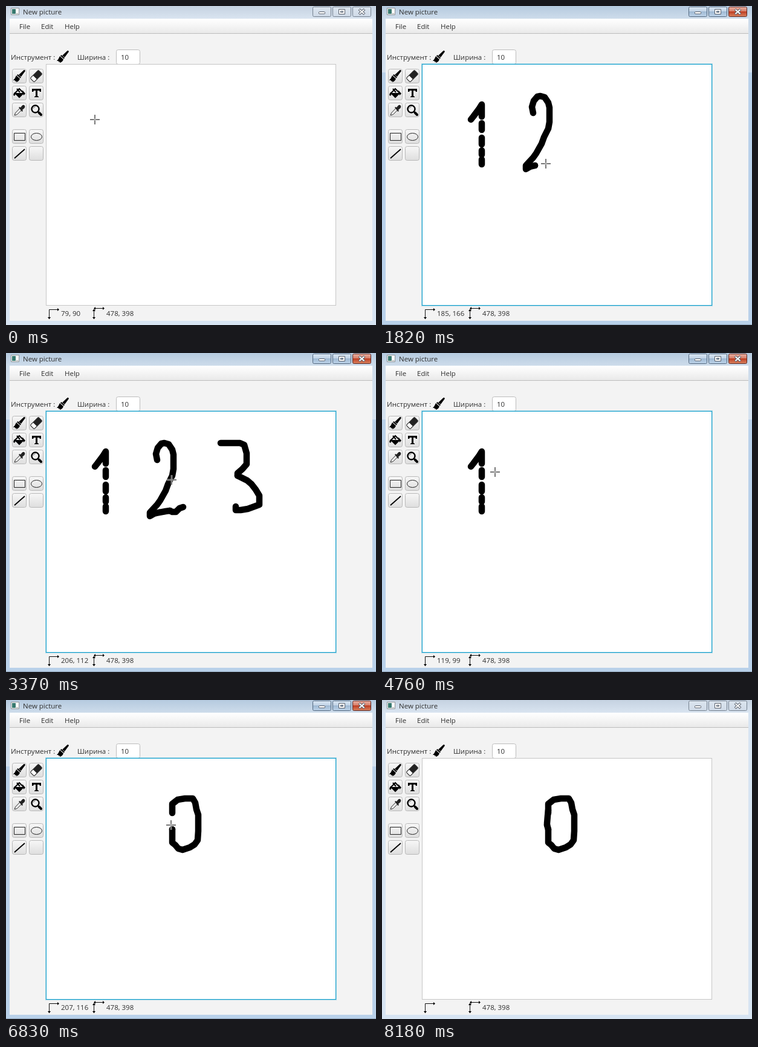
An HTML page that plays this animation: 612x528 px, repeating every 8240 ms.

```html
<!DOCTYPE html>
<html lang="ru">
<head>
<meta charset="utf-8">
<title>New picture</title>
<style>
  html, body { margin: 0; width: 100%; height: 100%; overflow: hidden; background: #d7e4f2; }
  svg { display: block; width: 612px; height: 528px; }
  text { font: 11.5px "Open Sans", "Noto Sans", sans-serif; fill: #2f2f2f; white-space: pre; }
  .on, .active .off { display: none; }
  .active .on { display: inline; }
  .btn { fill: url(#face); stroke: #b9b9b9; }
  .thin { fill: none; stroke: #222; }
  .cap { fill: url(#capOff); stroke: #75818f; }
  .active .cap { fill: url(#capOn); stroke: #53687f; }
  .active .close { fill: url(#capRed); stroke: #5c2620; }
  .glyph { fill: #fff; stroke: #58606c; }
  .sheet { fill: #fff; stroke: #c6c6c6; }
  .active .sheet { stroke: #129fcb; }
  #ink path { fill: none; stroke: #000; stroke-width: 10.5; stroke-linecap: round; stroke-linejoin: round; }
  #ink path.move { stroke: none; }
</style>
</head>
<body>
<svg id="app" viewBox="0 0 612 528">
  <defs>
    <linearGradient id="barOff" x2="0" y2="1">
      <stop stop-color="#c5d2e1"/><stop offset="1" stop-color="#d9e4f0"/>
    </linearGradient>
    <linearGradient id="barOn" x2="0" y2="1">
      <stop stop-color="#b5cadf"/><stop offset=".18" stop-color="#ccdbea"/>
      <stop offset="1" stop-color="#d5e2f0"/>
    </linearGradient>
    <linearGradient id="menu" x2="0" y2="1">
      <stop stop-color="#fff"/><stop offset=".4" stop-color="#f7f7f7"/>
      <stop offset="1" stop-color="#e9e9e9"/>
    </linearGradient>
    <linearGradient id="face" x2="0" y2="1">
      <stop stop-color="#f7f7f7"/><stop offset="1" stop-color="#dedede"/>
    </linearGradient>
    <linearGradient id="capOff" x2="0" y2="1">
      <stop stop-color="#dbe4ee"/><stop offset="1" stop-color="#d0dbe8"/>
    </linearGradient>
    <linearGradient id="capOn" x2="0" y2="1">
      <stop stop-color="#d9e6f3"/><stop offset=".48" stop-color="#c0d2e5"/>
      <stop offset=".5" stop-color="#9fb9d3"/><stop offset="1" stop-color="#bed4ea"/>
    </linearGradient>
    <linearGradient id="capRed" x2="0" y2="1">
      <stop stop-color="#e9b0a2"/><stop offset=".48" stop-color="#d57c67"/>
      <stop offset=".5" stop-color="#bf3e23"/><stop offset="1" stop-color="#d98460"/>
    </linearGradient>
    <g id="brush">
      <path d="M9 -10L10 -8.5L3 1L-1 -2L7 -9.5Q8 -10.5 9 -10Z"/>
      <path d="M-2.5 -3L3 2L1.5 3.5L-4 -1.5Z"/>
      <path d="M-5 -1L1 4.5Q-1 9 -5 10L-5 8L-7 9L-7 7L-10 7Q-7 4 -5 -1Z"/>
    </g>
  </defs>

  <g class="off">
    <path fill="#d7e4f2" d="M0 0H612V528H0Z"/>
    <path fill="url(#barOff)" d="M0 0H612V21H0Z"/>
  </g>
  <g class="on">
    <path fill="#b9d1ea" d="M0 0H612V528H0Z"/>
    <path fill="url(#barOn)" d="M0 0H612V110H0Z"/>
    <path fill="#90a5bb" d="M0 527H612V528H0Z"/>
  </g>

  <path fill="#f3f3f3" d="M6 21H606V521H6Z"/>
  <path fill="url(#menu)" d="M6 21H606V45H6Z"/>
  <path fill="#bdbdbd" d="M6 45H606V46H6Z"/>

  <path fill="#fff" stroke="#8b9195" d="M8.500 3.500H21.500V14.500H8.500Z"/>
  <path fill="#397a70" d="M10 5H16V13H10Z"/>
  <path fill="#555" d="M17 12H18V13H17ZM19 12H20V13H19Z"/>

  <text x="28" y="14">New picture</text>
  <text x="22" y="38">File</text>
  <text x="58" y="38">Edit</text>
  <text x="97" y="38">Help</text>
  <text x="8" y="89">Инструмент :</text>
  <text x="118" y="89">Ширина :</text>
  <use href="#brush" x="94" y="84"/>

  <rect class="cap" x="507.500" y="1.500" width="30" height="16" rx="2"/>
  <rect class="cap" x="540.500" y="1.500" width="30" height="16" rx="2"/>
  <rect class="cap close" x="573.500" y="1.500" width="30" height="16" rx="2"/>
  <rect class="glyph" x="517.500" y="9.500" width="10" height="3.500" rx="1"/>
  <path class="glyph" fill-rule="evenodd" d="M550.500 5.500H560.500V13.500H550.500ZM553.500 8.500H557.500V10.500H553.500Z"/>
  <path fill="none" stroke="#58606c" stroke-width="4" d="M584 5.500L593 13.500M593 5.500L584 13.500"/>
  <path fill="none" stroke="#fff" stroke-width="2" d="M584.500 6L592.500 13M592.500 6L584.500 13"/>

  <rect x="182.500" y="72.500" width="39" height="24" rx="3" fill="#fff" stroke="#bcbcbc"/>
  <text x="190" y="89">10</text>

  <g id="tools"></g>
  <use href="#brush" x="22" y="116"/>
  <g transform="translate(50 116) rotate(-45)">
    <rect x="-9.500" y="-4.500" width="19" height="9" rx="1.500" fill="#fff" stroke="#222"/>
    <path fill="#222" d="M-3 -4.500H8Q9.500 -4.500 9.500 -3V3Q9.500 4.500 8 4.500H-3Z"/>
  </g>
  <path fill="none" stroke="#000" stroke-width="2" d="M22 137L29 144L22 151L15 144ZM18 137L23 143"/>
  <path d="M15 144H29L22 151ZM14 143Q11 147 13 148.500Q16 149 15.500 144ZM27 139L32 145L29 148Z"/>
  <path d="M43 137H58V142H56L55 140H52V149L54 150V151H47V150L49 149V140H46L45 142H43Z"/>
  <path fill="#e9e9e9" stroke="#333" d="M14 181L15.500 177L23 169L26 172L18.500 179.500Z"/>
  <path fill="#222" d="M21 168L22.500 167L24 168L27 164.500Q29 163 31 165Q32 167 30.500 169L27 172L28 173.500L26.500 175Z"/>
  <path stroke="#000" stroke-width="4" stroke-linecap="round" d="M54.500 176.500L58 180"/>
  <circle cx="48.500" cy="170.500" r="6" fill="#eee" stroke="#000" stroke-width="2.400"/>
  <path fill="none" stroke="#777" d="M45 170Q45.500 167 48.500 167"/>
  <path class="thin" d="M13.500 210.500H31.500V222.500H13.500Z"/>
  <ellipse class="thin" cx="50.500" cy="216.500" rx="9" ry="6"/>
  <path stroke="#000" stroke-width="1.800" d="M14 252L31 237"/>

  <rect class="on" x="65.500" y="95.500" width="481" height="401" fill="none" stroke="#129fcb" stroke-opacity=".35"/>
  <rect class="sheet" x="66.500" y="96.500" width="479" height="399"/>

  <g id="ink"></g>

  <path fill="none" stroke="#111" d="M71.500 517V502.500H87M145.500 503V517M147 500.500H161"/>
  <path d="M69 515H74L71.500 518.500ZM85 500V505L88 502.500ZM143 515H148L145.500 518.500ZM143 505H148L145.500 501.500ZM148 498V503L145 500.500ZM160 498V503L163 500.500Z"/>
  <text id="where" x="91" y="513"></text>
  <text x="166" y="513">478, 398</text>

  <g id="cross">
    <path stroke="#fff" stroke-opacity=".5" stroke-width="3" d="M-8 0H8M0 -8V8"/>
    <path stroke="#777" stroke-width="2" d="M-8 0H-1.500M1.500 0H8M0 -8V-1.500M0 1.500V8"/>
    <path stroke="#888" stroke-width="1" d="M-2 0H2M0 -2V2"/>
  </g>
  <path id="arrow" fill="#fff" stroke="#000" d="M.500 .500V16L4 12.500L6.500 18L9 17L6.500 11.500H11.500Z"/>
</svg>
<script>
const LOOP = 8240, STEP = 60, LAG = 60;
const NS = 'http://www.w3.org/2000/svg';
const $ = id => document.getElementById(id);

// Cursor steps restart at each of these times.
const starts = [0, 240, 1090, 1940, 2770, 3610, 4450, 5550, 6110, 6950, 7750, 7810];
// Time at which undo removes each digit.
const gone = { one: 5050, two: 4210, three: 3850, zero: LOOP };

// Start, end, cursor path, digit being drawn.
const legs = [
  [240, 420, 'M147 188L151 183L160 171L165 163V183', 'one'],
  [450, 480, 'M165 194V205', 'one'],
  [520, 540, 'M165 218V229', 'one'],
  [580, 600, 'M165 239V246', 'one'],
  [620, 650, 'M165 254V262', 'one'],
  [660, 900, 'M165 262Q205 235 248 182'],
  [960, 1020, 'M248 182L250 177'],
  [1090, 1750, 'M250 177L248 167L251 157L257 150L262 149L269 151L275 160L277 168V192L275 203L268 217L264 228L255 244L250 251L238 264V270L245 266L253 264', 'two'],
  [1750, 1810, 'M253 264L264 262L271 261', 'two'],
  [1810, 2020, 'M271 261L275 263H281L287 257L293 255', 'two'],
  [2060, 2360, 'M293 255Q320 190 355 149'],
  [2360, 2700, 'M355 149H387L394 152L398 166V184L391 192L383 199V203', 'three'],
  [2710, 3130, 'M383 203L391 207L399 211L406 217L413 226L419 236V251L411 254L400 258L388 260H380V254', 'three'],
  [3140, 3370, 'M380 254L274 210'],
  [3610, 4330, 'M274 210Q340 260 386 230'],
  [4450, 4750, 'M386 230L187 197'],
  [4750, 5110, 'M187 197L170 230'],
  [5550, 5850, 'M170 230L275 192'],
  [6110, 6770, 'M275 187V172L284 165L296 163H309L313 170L315 181L318 190V217L317 232L312 239L304 244L292 248L285 246L280 240L275 236V214', 'zero'],
  [6770, 6830, 'M275 214L273 207', 'zero'],
  [6830, 6950, 'M273 207V204L274 192L275 182', 'zero'],
  [7010, 7730, 'M275 182L535 497'],
].map(([from, to, d, digit]) => {
  const path = document.createElementNS(NS, 'path');
  path.setAttribute('d', d);
  if (!digit) path.setAttribute('class', 'move');
  $('ink').append(path);
  return { from, to, digit, path, len: path.getTotalLength() };
});

for (const y of [104, 132, 160, 204, 232]) {
  for (const x of [10, 38]) {
    const r = document.createElementNS(NS, 'rect');
    const box = { class: 'btn', x: x + .5, y: y + .5, width: 23, height: 23, rx: 3 };
    for (const k in box) r.setAttribute(k, box[k]);
    $('tools').append(r);
  }
}

const part = (leg, t) => Math.max(0, Math.min(1, (t - leg.from) / (leg.to - leg.from)));
const legAt = t => legs.findLast(l => l.from <= t) || legs[0];
function cursorAt(t) {
  const leg = legAt(t);
  return leg.path.getPointAtLength(leg.len * part(leg, t));
}
function snap(t) {
  const s = starts.findLast(v => v <= t);
  return s + Math.floor((t - s) / STEP) * STEP;
}
const show = (el, on) => { el.style.display = on ? '' : 'none'; };

function draw() {
  const now = performance.now() % LOOP, t = snap(now);
  $('app').classList.toggle('active', now >= 240 && now < 8180);

  for (const leg of legs) {
    if (!leg.digit) continue;
    const tip = t - LAG;
    show(leg.path, tip >= leg.from && t < gone[leg.digit]);
    leg.path.style.strokeDasharray = `${leg.len * part(leg, tip)} 999`;
  }

  // The readout trails the cursor while the brush is down.
  const p = cursorAt(t), q = legAt(t).digit ? cursorAt(t - LAG) : p;
  const x = Math.round(q.x - 68), y = Math.min(398, Math.round(q.y - 98));
  $('where').textContent = now < 7810 ? `${x}, ${y}` : '';

  show($('cross'), now < 7750);
  show($('arrow'), now >= 7750 && now < 7810);
  $('cross').setAttribute('transform', `translate(${Math.round(p.x)} ${Math.round(p.y)})`);
  $('arrow').setAttribute('transform', `translate(${Math.round(p.x)} ${Math.round(p.y)})`);
  requestAnimationFrame(draw);
}
draw();
</script>
</body>
</html>
```
